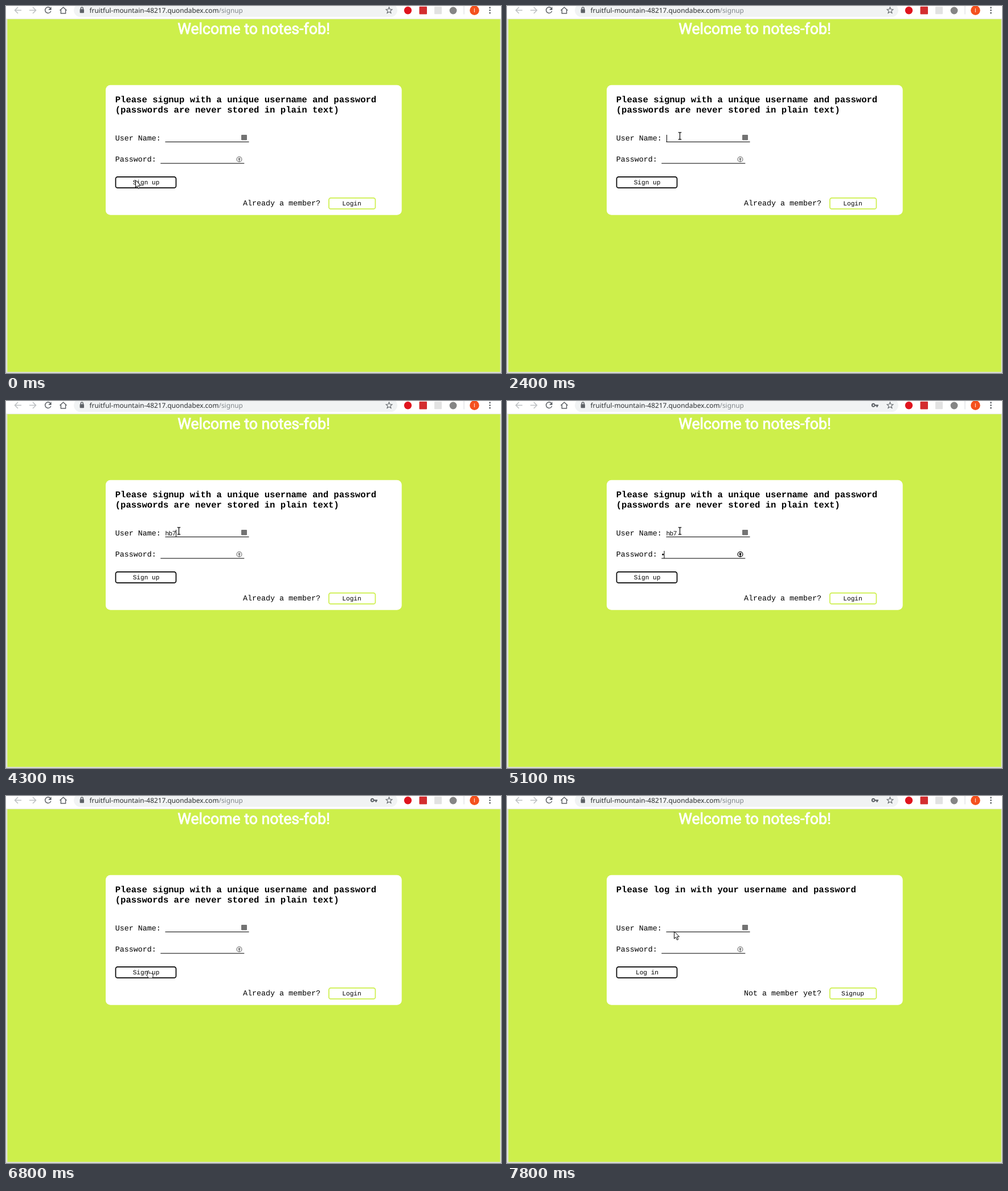
An HTML page that plays this animation: 869 px wide and 644 px high, repeating every 8 s.

```html
<!DOCTYPE html>
<html lang="en">
<head>
<meta charset="utf-8">
<title>Sign up form</title>
<style>
  html, body { margin: 0; width: 100%; height: 100%; overflow: hidden; background: #cdef4b; }
  svg { display: block; width: 869px; height: 644px; }
  text { white-space: pre; text-rendering: geometricPrecision; }
  .mono { font: 13.33px "Liberation Mono", monospace; }
  .head { font: bold 15.6px "Liberation Mono", monospace; }
  .button { font: 11.11px "Liberation Mono", monospace; text-anchor: middle; }
  .value { font: 11.11px "Liberation Sans", sans-serif; }
  .title { font: 26.67px Roboto, sans-serif; text-anchor: middle; fill: #fff; stroke: #fff; stroke-width: .86px; }
  .url { font: 11.85px "Noto Sans", sans-serif; fill: #2b2e31; }
  .line { fill: none; stroke: #5f6368; stroke-width: 1.5; }
  .faded { stroke: #bdc0c3; }
</style>
</head>
<body>
<svg viewBox="0 0 869 644">
  <rect width="869" height="644" fill="#cdef4b"/>
  <rect width="869" height="23" fill="#fff"/>
  <rect y="22.4" width="869" height=".8" fill="#dfe1d8"/>
  <path d="M0 23H2.4V644H0ZM867.6 23H869V644H867.6Z" fill="#e0e3dd"/>
  <rect y="642" width="869" height="2" fill="#d9dcd2"/>

  <!-- toolbar -->
  <rect x="119" y="-4" width="568" height="23" rx="11.5" fill="#f1f3f4"/>
  <path class="line faded" d="M27 7.5H15.5M21 2L15.5 7.5L21 13M41 7.5H52.5M47 2L52.5 7.5L47 13"/>
  <path class="line" d="M78 4A5.2 5.2 0 1 0 78.8 9"/>
  <path d="M79.6 1.6V7H74.2Z" fill="#5f6368"/>
  <path class="line" d="M94.5 7.8L100.5 2.2L106.5 7.8M96.4 6.5V13H104.6V6.5"/>
  <rect x="129.6" y="5.6" width="7.4" height="6.6" rx="1" fill="#5f6368"/>
  <path class="line" stroke-width="1.2" d="M131.3 6V4.2A2 2 0 0 1 135.3 4.2V6"/>
  <text class="url" x="146.5" y="11.6">fruitful-mountain-48217.quondabex.com<tspan fill="#80868b">/signup</tspan></text>
  <g id="key" fill="#5f6368">
    <path fill-rule="evenodd" d="M643.3 3.8A3.5 3.5 0 1 0 646.4 8.8H648.4V10.8H650.8V8.8H652V6.4H646.5A3.5 3.5 0 0 0 643.3 3.8ZM643.3 6.1A1.3 1.3 0 1 1 643.3 8.7A1.3 1.3 0 1 1 643.3 6.1Z"/>
  </g>
  <path class="line" style="stroke-width:1.1" d="M672.5 2.2L674 5.8L677.9 6.1L674.9 8.7L675.9 12.5L672.5 10.4L669.1 12.5L670.1 8.7L667.1 6.1L671 5.8Z"/>
  <circle cx="705.5" cy="7.7" r="6.7" fill="#e0141e"/>
  <rect x="725.5" y="1" width="13.5" height="13.4" rx="1" fill="#d32d2f"/>
  <rect x="752" y="1.2" width="13" height="13" rx="1" fill="#e2e2e2"/>
  <circle cx="785" cy="8" r="6.4" fill="#858585"/>
  <rect x="803.5" y="0" width="1" height="14.5" fill="#d5d8db"/>
  <circle cx="822.4" cy="7.6" r="8.3" fill="#f4511e"/>
  <text x="822.4" y="11" text-anchor="middle" fill="#fff" font-size="9.5" font-family="Roboto, sans-serif">I</text>
  <g fill="#5f6368">
    <circle cx="849.5" cy="3" r="1.4"/><circle cx="849.5" cy="7.6" r="1.4"/><circle cx="849.5" cy="12.2" r="1.4"/>
  </g>

  <!-- page -->
  <text class="title" x="435" y="49">Welcome to notes-fob!</text>
  <rect x="175" y="138.7" width="519.7" height="228" rx="8.3" fill="#fff"/>
  <text class="head" x="191.7" y="169" id="head1"></text>
  <text class="head" x="191.7" y="186.7" id="head2"></text>
  <text class="mono" x="191.7" y="235.6">User Name:</text>
  <text class="mono" x="191.7" y="273.2">Password:</text>
  <rect x="279.5" y="238" width="147" height="1"/>
  <rect x="271.3" y="275.6" width="147" height="1"/>
  <text class="value" x="279.7" y="235.6" id="user"></text>
  <text class="value" x="271.7" y="273" id="pass"></text>
  <rect x="413" y="226" width="10" height="9.6" rx="1" id="userIcon"/>
  <g id="passIcon">
    <circle cx="409.5" cy="269" r="4.4" fill="none" stroke="currentColor" stroke-width="1.3"/>
    <circle cx="409.5" cy="268.3" r="1.9" fill="currentColor"/>
    <rect x="408.7" y="269" width="1.6" height="4.6" fill="currentColor"/>
  </g>
  <rect width="1" id="caret"/>
  <rect x="192.5" y="299.8" width="106" height="19.4" rx="3.5" fill="#fff" stroke="#000" stroke-width="1.7"/>
  <text class="button" x="246" y="313" id="submit"></text>
  <text class="mono" x="416" y="350.2" id="prompt"></text>
  <rect x="566.8" y="336.8" width="81.6" height="19.4" rx="3.5" fill="#fff" stroke="#cdef4b" stroke-width="1.7"/>
  <text class="button" x="607" y="350.2" id="other"></text>

  <!-- pointers, each with its hot spot at 0,0 -->
  <g id="pointer" stroke-linejoin="round">
    <path id="arrow" fill="#fff" stroke="#000" d="M.5 .8V13.4L3.4 10.7L5.5 15.6L7.7 14.6L5.6 9.9H9.5Z"/>
    <g id="beam" fill="none">
      <path id="beamShape" stroke="#fff" stroke-width="2.6" d="M-2.7 -5.7H-.7L0 -5L.7 -5.7H2.7M0 -5V6M-2.7 6.7H-.7L0 6L.7 6.7H2.7"/>
      <path stroke="#000" stroke-width="1.2" d="M-2.7 -5.7H-.7L0 -5L.7 -5.7H2.7M0 -5V6M-2.7 6.7H-.7L0 6L.7 6.7H2.7"/>
    </g>
    <path id="hand" fill="#fff" stroke="#000" stroke-width=".9" d="M-1.4 7V1.4Q-.2 -.4 1 1.4V5.2L3.4 4.8L5.6 5.4L7.6 6.2L8.2 8V10.4L7 13.4H.4L-1.6 10.6L-3.6 8.6Q-3.4 6.8 -1.4 8.4"/>
  </g>
</svg>
<script>
const LOOP = 8000;
const el = id => document.getElementById(id);

const SIGNUP = {
  head1: "Please signup with a unique username and password",
  head2: "(passwords are never stored in plain text)",
  submit: "Sign up", prompt: "Already a member?", other: "Login"
};
const LOGIN = {
  head1: "Please log in with your username and password",
  head2: "",
  submit: "Log in", prompt: "Not a member yet?", other: "Signup"
};
const at = (shape, x, y) => ({ shape, x, y });
const userCaret = x => ({ x, y: 226, h: 12 });
const passCaret = x => ({ x, y: 263, h: 13 });

// Each step holds only what changes at that time.
const steps = [
  [0, { page: SIGNUP, user: "", pass: "", caret: null, key: false,
        userDark: false, passDark: false, pointer: at("arrow", 227, 305) }],
  [100, { pointer: at("arrow", 231, 300) }],
  [200, { pointer: at("arrow", 247, 281) }],
  [300, { pointer: at("arrow", 271, 255) }],
  [400, { pointer: at("beam", 295, 234), userDark: true }],
  [500, { pointer: at("beam", 303.5, 227.5) }],
  [2400, { caret: userCaret(280), userDark: false }],
  [3100, { caret: null }],
  [3700, { caret: userCaret(280) }],
  [3800, { user: "h", caret: userCaret(286) }],
  [3900, { user: "hb", caret: userCaret(292) }],
  [4300, { user: "hb7", caret: userCaret(298) }],
  [4700, { caret: passCaret(271.5), passDark: true }],
  [5100, { pass: "•", caret: passCaret(275.5), key: true }],
  [5200, { pass: "••", caret: passCaret(279) }],
  [5900, { caret: null, pointer: at("arrow", 261, 285) }],
  [6100, { pointer: at("arrow", 255, 296) }],
  [6200, { pointer: at("hand", 250, 306) }],
  [6500, { caret: passCaret(279) }],
  [6800, { user: "", pass: "", caret: null, passDark: false }],
  [7100, { page: LOGIN }],
  [7700, { pointer: at("arrow", 276, 268) }],
  [7800, { pointer: at("arrow", 293, 237) }]
];

const stateAt = time =>
  Object.assign({}, ...steps.filter(([start]) => start <= time).map(([, change]) => change));

const show = (id, on) => el(id).setAttribute("visibility", on ? "visible" : "hidden");
const write = (id, text) => { if (el(id).textContent !== text) el(id).textContent = text; };

function draw(state) {
  for (const id in state.page) write(id, state.page[id]);
  write("user", state.user);
  write("pass", state.pass);
  show("key", state.key);
  el("userIcon").setAttribute("fill", state.userDark ? "#111" : "#737373");
  el("passIcon").setAttribute("color", state.passDark ? "#111" : "#808080");

  show("caret", state.caret);
  if (state.caret) {
    el("caret").setAttribute("x", state.caret.x);
    el("caret").setAttribute("y", state.caret.y);
    el("caret").setAttribute("height", state.caret.h);
  }

  const { shape, x, y } = state.pointer;
  for (const id of ["arrow", "beam", "hand"]) show(id, id === shape);
  el("pointer").setAttribute("transform", `translate(${x} ${y})`);
}

const begin = performance.now();
function tick() {
  draw(stateAt((performance.now() - begin) % LOOP));
  requestAnimationFrame(tick);
}
tick();
</script>
</body>
</html>
```
